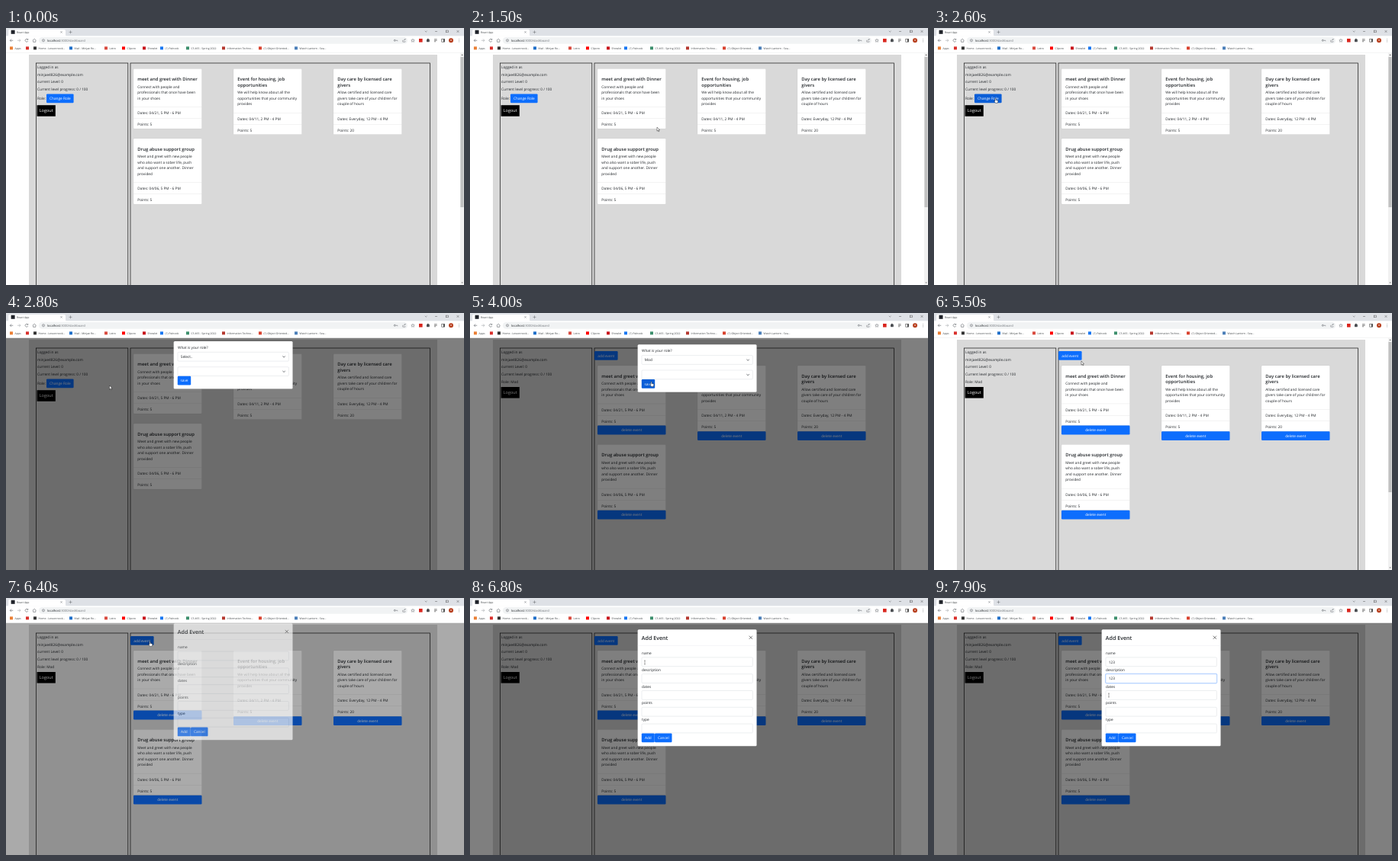
These frames come from a looping animation (600x337 px, 8 s). An HTML page:

```html
<!DOCTYPE html>
<html lang="en">
<head>
<meta charset="utf-8">
<title>Dashboard</title>
<style>
html, body { margin: 0; width: 100%; height: 100%; overflow: hidden; background: #fff; }
svg { display: block; width: 100vw; height: 100vh; }
text { font-family: "Open Sans", "Noto Sans", sans-serif; text-rendering: geometricPrecision; white-space: pre; }
</style>
</head>
<body>
<svg id="stage" viewBox="0 0 600 337"></svg>
<script>
const LOOP = 8000, STEP = 100;
const INK = '#212529', BLUE = '#0d6efd', BLUE_HOVER = '#0b5ed7', GREY = '#5f6368';
const TIMES = { role: [2640, 4755], add: [6300, Infinity], saved: 3900 };

// Drawing helpers; text is placed by its left edge (or anchor) and visual middle.
const rect = (x, y, w, h, fill, extra = '') =>
  `<rect x="${x}" y="${y}" width="${w}" height="${h}" fill="${fill}" ${extra}/>`;
const circle = (x, y, r, fill, extra = '') => `<circle cx="${x}" cy="${y}" r="${r}" fill="${fill}" ${extra}/>`;
const line = (d, color = GREY, width = .5, extra = '') =>
  `<path d="${d}" fill="none" stroke="${color}" stroke-width="${width}" ${extra}/>`;
const text = (x, middle, str, size = 4.75, fill = INK, extra = '') =>
  `<text x="${x}" y="${middle + size * .36}" font-size="${size}" fill="${fill}" ${extra}>${str}</text>`;
const cross = (x, y, r, color, width) =>
  line(`M${x - r} ${y - r}l${2 * r} ${2 * r}m0 ${-2 * r}l${-2 * r} ${2 * r}`, color, width);
const button = (x, y, w, label, fill = BLUE, h = 11.8) =>
  rect(x, y, w, h, fill, 'rx="1.2"') +
  text(x + w / 2, y + h / 2, label, 4.75, '#fff', 'text-anchor="middle"');

function browser() {
  const bookmarks = [
    [7, '#ea8035', 'Apps'], [28, '#d9302c', ''], [38, '#333', 'Home - Lessonnook...'],
    [85, '#1f6fc9', 'Mail - Minjae Ro...'], [131, '#d94b3f', 'Letro'], [154, '#f00', 'Cliporo'],
    [181, '#c8141c', 'Showlet'], [204, '#1877f2', '(1) Palnook'], [238, '#3c8f6c', 'CS 465 - Spring 2022'],
    [285, '#b5382f', 'Information Techno...'], [333, '#d9432f', '(1) Object Oriented...'],
    [380, '#4b7fb8', 'Watch Lantern - Sea...']
  ];
  return rect(0, 0, 600, 10.6, '#dee1e6') + rect(0, 10.6, 600, 21.9, '#fff') +
    `<path d="M2 10.7Q3.2 10.7 3.2 9V3.5Q3.2 2 5 2H76Q78 2 78 3.5V9Q78 10.7 79.5 10.7Z" fill="#fff"/>` +
    rect(6.6, 2.8, 5, 5, '#20232a') + text(14, 5.6, 'React App', 3.5, '#3c4043') +
    cross(72.5, 5.4, 1.1, GREY, .5) + line('M82.5 5.4h4m-2-2v4', GREY) +
    line('M548.8 3.8l1.4 1.4 1.4-1.4M562 4.5h3', '#333', .4) +
    rect(576.8, 3.1, 2.7, 2.7, 'none', 'stroke="#333" stroke-width=".4"') + cross(592, 4.5, 1.4, '#333', .4) +
    line('M9.3 16.3h-4m1.8-1.8l-1.8 1.8 1.8 1.8', GREY, .6) +
    line('M15 16.3h4m-1.8-1.8l1.8 1.8-1.8 1.8', '#a0a4a8', .6) +
    line('M28.6 15.2a1.9 1.9 0 1 0 .2 1.8m0-3v1.4h-1.4', GREY, .6) +
    line('M34.8 16.3l2.4-2 2.4 2m-4 0v2.1h3.2v-2.1', GREY, .6) +
    rect(43, 12, 483, 8.8, '#f1f3f4', 'rx="4.4"') +
    circle(49, 16.3, 1.6, 'none', `stroke="${GREY}" stroke-width=".5"`) + line('M49 16v1.2m0-2v.4') +
    text(54, 16.3, 'localhost<tspan fill="#70757a">:3000/dashboard</tspan>', 4.1) +
    circle(509.3, 16.3, 1, 'none', `stroke="${GREY}" stroke-width=".6"`) + line('M510.3 16.3h2.6v1') +
    line('M519.8 15.8v2.4h3.2v-1m-2-.6q.2-1.8 2.4-1.8m-1-1l1 1-1 1') +
    line('M533 14.2l.7 1.4 1.5.2-1.1 1 .3 1.5-1.4-.7-1.4.7.3-1.5-1.1-1 1.5-.2z') +
    rect(541, 14, 4.6, 4.6, '#d9251d') + rect(551, 14.7, 3.8, 3.6, '#4a4d51', 'rx=".6"') +
    circle(552.8, 14.6, .9, '#4a4d51') + line('M561 14.8h3.6m-3.6 1.5h3.6m-3.6 1.5h2', '#333', .6) +
    rect(570.8, 14.4, 3.8, 3.8, 'none', 'stroke="#444" stroke-width=".6"') + rect(573, 14.4, 1.6, 3.8, '#444') +
    circle(583, 16.3, 3, '#b8401f') + text(583, 16.3, 'M', 2.8, '#fff', 'text-anchor="middle"') +
    [14.6, 16.3, 18].map(y => circle(593.5, y, .45, GREY)).join('') +
    bookmarks.map(([x, color, label]) =>
      rect(x - 2, 24.4, 4, 4, color) + text(x + 4.6, 26.5, label, 3.45, '#3c4043')).join('') +
    rect(0, 32.2, 600, .4, '#e4e5e7');
}

const CARDS = [
  { x: 167, y: 53.5, title: ['meet and greet with Dinner'], when: '04/21, 5 PM - 6 PM', points: 5,
    body: ['Connect with people and', 'professionals that once have been', 'in your shoes'] },
  { x: 298, y: 53.5, title: ['Event for housing, job', 'opportunities'], when: '04/11, 2 PM - 4 PM', points: 5,
    body: ['We will help know about all the', 'opportunities that your community', 'provides'] },
  { x: 429, y: 53.5, title: ['Day care by licensed care', 'givers'], when: 'Everyday, 12 PM - 4 PM', points: 20,
    body: ['Allow certified and licensed care', 'givers take care of your children for', 'couple of hours'] },
  { x: 167, y: 145, title: ['Drug abuse support group'], when: '04/06, 5 PM - 6 PM', points: 5,
    body: ['Meet and greet with new people', 'who also want a sober life, push', 'and support one another. Dinner', 'provided'] }
];

function card({ x, y, title, body, when, points }, isMod) {
  const left = x + 5.3, w = 89.5;
  if (isMod) y += y > 100 ? 27.5 : 15.4;
  const bodyTop = y + 23.4 + 7.6 * (title.length - 1);
  const rule = bodyTop + 7.5 * (body.length - 1) + 11.5;
  const bottom = rule + 28.6;
  const divider = at => rect(x, at, w, .35, '#dcdcdc');
  return rect(x, y, w, bottom - y, '#fff', 'rx="1.2" stroke="#000" stroke-opacity=".12" stroke-width=".3"') +
    title.map((s, i) => text(left, y + 13.6 + 7.6 * i, s, 5.9, INK, 'font-weight="600"')).join('') +
    body.map((s, i) => text(left, bodyTop + 7.5 * i, s)).join('') +
    divider(rule) + text(left, rule + 8, 'Dates: ' + when) +
    divider(rule + 15.2) + text(left, rule + 23.2, 'Points: ' + points) +
    (isMod ? button(x, bottom + .2, w, 'delete event') : '');
}

function page(t) {
  const isMod = t >= TIMES.saved;
  const frame = (x, w) => rect(x, 46, w, 300, 'none', 'stroke="#111" stroke-width=".7"');
  const logoutY = isMod ? 97 : 101.2;
  return rect(0, 32.5, 600, 305, '#fff') + rect(30, 35, 535, 302, '#d9d9d9') +
    frame(39.4, 120.4) + frame(163, 392.6) +
    ['Logged in as', 'minjae4826@example.com', 'current Level: 0', 'Current level progress: 0 / 100']
      .map((s, i) => text(41, 51.3 + 9.7 * i, s)).join('') +
    text(41, isMod ? 90.2 : 92, isMod ? 'Role: Mod' : 'Role:') +
    (isMod
      ? button(163, 50, 30.6, 'add event', t >= 5700 && t < 6800 ? BLUE_HOVER : BLUE)
      : button(53, 86.4, 35.6, 'Change Role', t >= 2400 && t < 2700 ? BLUE_HOVER : BLUE)) +
    rect(40.6, logoutY, 24.2, 14.6, '#000') +
    text(52.7, logoutY + 7.3, 'Logout', 5.5, '#fff', 'text-anchor="middle"') +
    CARDS.map(c => card(c, isMod)).join('');
}

const scrollbar = () => rect(595, 32.5, 5, 305, '#f1f1f1') + rect(595.4, 38, 4.2, 197, '#c1c1c1') +
  '<path d="M596.4 36l1.2-1.4 1.2 1.4zM596.4 333.4l1.2 1.4 1.2-1.4z" fill="#606060"/>';

const field = (y, value = '', focused = false) =>
  (focused ? rect(224.1, y - .9, 147.2, 13.6, BLUE, 'rx="1.8" opacity=".25"') : '') +
  rect(225, y, 145.4, 11.8, '#fff', `rx="1.2" stroke="${focused ? '#86b7fe' : '#ced4da'}" stroke-width=".4"`) +
  text(228.8, y + 5.9, value);

// Shared modal transition: linear fade in 150 ms, eased 300 ms slide from above.
function modal(t, [opensAt, closesAt], height, content) {
  const closing = t >= closesAt;
  const age = t - (closing ? closesAt : opensAt);
  if (age < 0 || closing && age >= 150) return '';
  const fade = Math.min(1, age / 150);
  const slide = 1 - (1 - Math.min(1, age / 300)) ** 1.7;
  const opacity = closing ? 1 - fade : fade;
  const lift = -15.6 * (closing ? slide : 1 - slide);
  return rect(0, 32.5, 600, 305, '#000', `opacity="${opacity / 2}"`) +
    `<g opacity="${opacity}" transform="translate(0 ${lift})">` +
    rect(219.6, 41.2, 156, height, '#fff', 'rx="1.5" stroke="#000" stroke-opacity=".2" stroke-width=".3"') +
    content + '</g>';
}

function roleModal(t) {
  const chevron = y => line(`M362.4 ${y}l1.7 1.6 1.7-1.6`, '#343a40', .7);
  return modal(t, TIMES.role, 62.6,
    text(225, 49.3, 'What is your role?') +
    field(55.6, t >= 3500 ? 'Mod' : 'Select..', t >= 3300 && t < TIMES.saved) + chevron(60.8) +
    field(75, '') + chevron(80.2) +
    button(224.8, 87, 17.4, 'save', t >= TIMES.saved ? BLUE_HOVER : BLUE));
}

function addModal(t) {
  const typed = start => '123'.slice(0, Math.max(0, Math.floor((t - start) / 100) + 1));
  const values = [typed(7100), typed(7700)];
  const focus = t < 7000 ? -1 : t < 7500 ? 0 : 1;
  return modal(t, TIMES.add, 153,
    text(224.8, 52, 'Add Event', 7.1, INK, 'font-weight="600"') + cross(367.8, 51.8, 2.1, '#444', .7) +
    rect(219.6, 62.4, 156, .3, '#dee2e6') +
    ['name', 'description', 'dates', 'points', 'type'].map((label, i) =>
      text(225, 72 + 21.9 * i, label) + field(77.9 + 21.8 * i, values[i], i === focus)).join('') +
    button(224.8, 177.4, 17, 'Add') + button(242, 177.4, 22.5, 'Cancel'));
}

const POINTERS = {
  arrow: '<path d="M0 0V5.2L1.2 4.1 2 5.9 2.8 5.6 2 3.8H3.6Z" fill="#fff" stroke="#000" stroke-width=".4"/>',
  hand: '<path d="M0 .4Q.6-.4 1.1.4V2.4L3.8 3V4.6L3.2 6.4H.6L-1.2 3.8Q-.8 3.2 0 3.8Z" fill="#fff" stroke="#000" stroke-width=".4"/>',
  beam: line('M-.8 0H.8M0 0V5M-.8 5H.8', '#222', .4)
};
// time, x, y, pointer shown from then on
const PATH = [
  [800, 594, 240, 'arrow'], [1300, 252, 134, 'arrow'], [1500, 245, 130, 'arrow'], [2300, 90, 97, 'arrow'],
  [2400, 80, 92, 'hand'], [2650, 80, 92, 'hand'], [2800, 135.5, 95, 'arrow'], [3200, 300, 59, 'arrow'],
  [3300, 300, 59, 'arrow'], [3600, 245, 64, 'arrow'], [3850, 245, 64, 'arrow'], [3900, 237, 90, 'hand'],
  [4800, 237, 90, 'hand'], [4900, 234, 88, 'arrow'], [5500, 193, 63, 'arrow'], [5700, 188, 57, 'hand'],
  [6400, 188, 57, 'hand'], [6500, 198, 63, 'arrow'], [6800, 229, 82, 'beam'], [7350, 229, 82, 'beam'],
  [7500, 229, 103, 'beam'], [7800, 229, 103, 'beam'], [7900, 229, 125, 'beam'], [8000, 229, 125, 'beam']
];

function pointer(t) {
  const i = PATH.findIndex(([at]) => at > t) - 1;
  if (i < 0) return '';
  const [t0, x0, y0, kind] = PATH[i], [t1, x1, y1] = PATH[i + 1];
  const k = (t - t0) / (t1 - t0);
  return `<g transform="translate(${x0 + (x1 - x0) * k} ${y0 + (y1 - y0) * k})">${POINTERS[kind]}</g>`;
}

const stage = document.getElementById('stage');
const chrome = browser();
let shown = -1;

function draw(now) {
  const t = Math.floor(now % LOOP / STEP) * STEP;
  if (t !== shown) {
    shown = t;
    const overlay = roleModal(t) + addModal(t);
    stage.innerHTML = page(t) + (overlay || scrollbar()) + chrome + pointer(t);
  }
  requestAnimationFrame(() => draw(performance.now()));
}
draw(performance.now());
</script>
</body>
</html>
```
